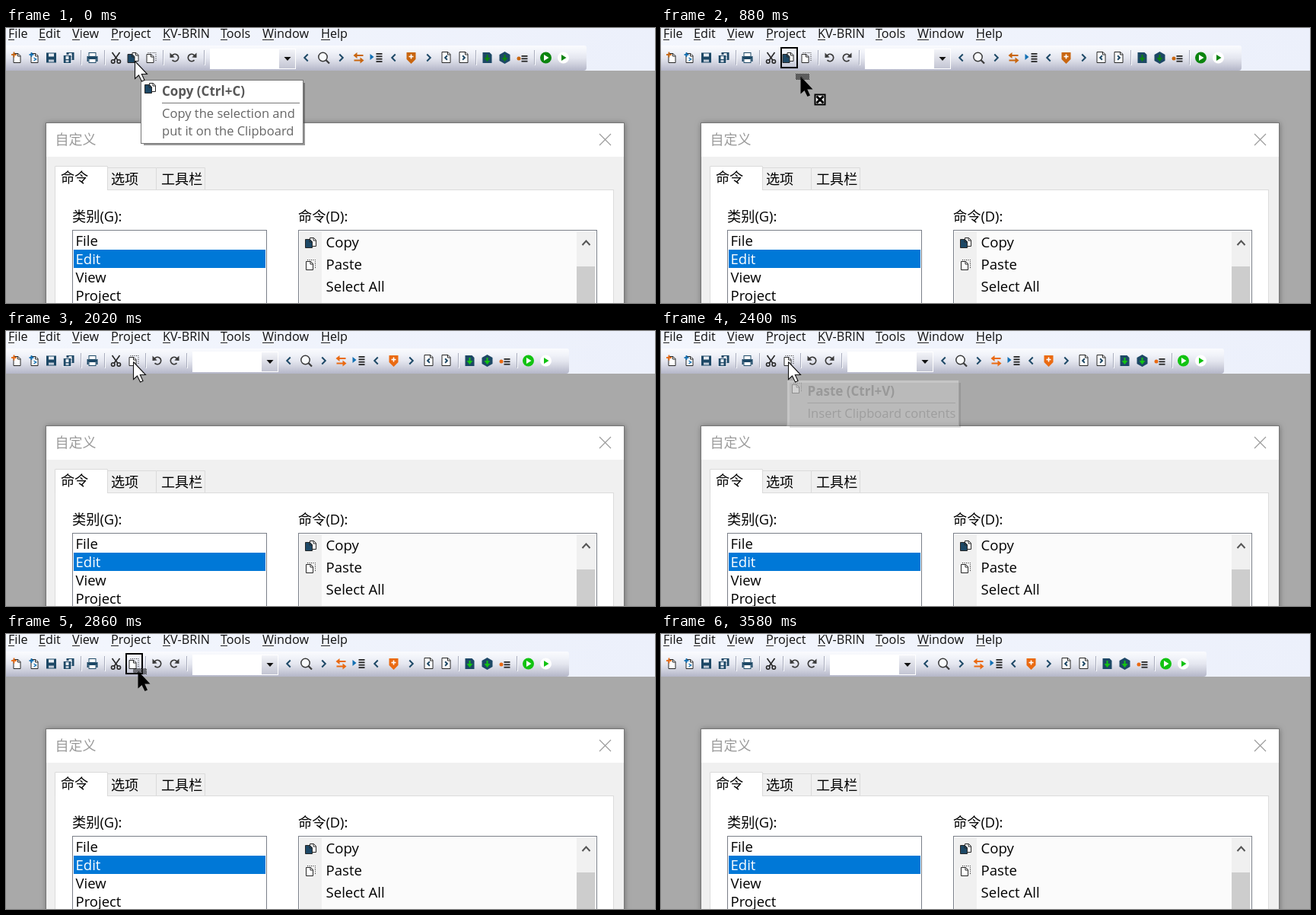
Animation, 853 px wide and 361 px high, one loop 3960 ms. Source, as an HTML page with a canvas:

```html
<!DOCTYPE html>
<html lang="zh-CN">
<head>
<meta charset="utf-8">
<title>Toolbar customisation</title>
<style>
html, body { margin: 0; width: 100%; height: 100%; overflow: hidden; background: #a9a9a9; }
canvas { display: block; }
</style>
</head>
<body>
<canvas id="stage" width="853" height="361"></canvas>
<script>
const ctx = document.getElementById('stage').getContext('2d');
const LOOP = 3960, PITCH = 23, GAP = 8, ROW = 39;
const FONT = '"Open Sans", "Noto Sans", "Noto Sans CJK SC", "Noto Sans CJK", sans-serif';
const NAVY = '#1d4866', INK = '#262626', BLUE = '#1270b4';
let green, orange;

// ---- helpers ----
function rect(color, x, y, w, h) {
  ctx.fillStyle = color;
  ctx.fillRect(x, y, w, h);
}
function frame(color, x, y, w, h, lw = 1) {
  ctx.strokeStyle = color;
  ctx.lineWidth = lw;
  ctx.strokeRect(x + lw / 2, y + lw / 2, w - lw, h - lw);
}
function trace(p) {
  ctx.beginPath();
  for (let i = 0; i < p.length; i += 2) ctx.lineTo(p[i], p[i + 1]);
}
function poly(color, ...p) {
  trace(p);
  ctx.closePath();
  ctx.fillStyle = color;
  ctx.fill();
}
function line(color, lw, ...p) {
  trace(p);
  ctx.strokeStyle = color;
  ctx.lineWidth = lw;
  ctx.stroke();
}
function disc(color, x, y, r) {
  ctx.beginPath();
  ctx.arc(x, y, r, 0, 7);
  ctx.fillStyle = color;
  ctx.fill();
}
function arc(color, lw, x, y, r, a = 0, b = 2 * Math.PI) {
  ctx.beginPath();
  ctx.arc(x, y, r, a, b);
  ctx.strokeStyle = color;
  ctx.lineWidth = lw;
  ctx.stroke();
}
function cross(color, lw, x, y, r) {
  line(color, lw, x - r, y - r, x + r, y + r);
  line(color, lw, x + r, y - r, x - r, y + r);
}
function plus(color, lw, x, y, r) {
  line(color, lw, x - r, y, x + r, y);
  line(color, lw, x, y - r, x, y + r);
}
function text(s, x, y, size, color = '#000', weight = 400) {
  ctx.font = `${weight} ${size}px ${FONT}`;
  ctx.fillStyle = color;
  ctx.fillText(s, x, y);
}
function at(x, y, draw) {
  ctx.save();
  ctx.translate(x, y);
  draw();
  ctx.restore();
}
function shade(x, y, ...colors) {
  const g = ctx.createLinearGradient(0, 0, x, y);
  colors.forEach((c, i) => g.addColorStop(i / (colors.length - 1), c));
  return g;
}

// ---- icons, centred on 0,0 ----
function page(x, y, w, h, fill = '#fff') {
  const outline = [x, y, x + w - 3, y, x + w, y + 3, x + w, y + h, x, y + h, x, y];
  poly(fill, ...outline);
  line(INK, 1, ...outline);
  line(INK, 1, x + w - 3.5, y, x + w - 3.5, y + 3.5, x + w, y + 3.5);
}
function floppy(x, y, s) {
  rect(NAVY, x, y, s, s);
  rect('#e8edf3', x + 3, y + 1, s - 6, 4);
  rect('#c3ccd8', x + 3, y + s - 4, s - 6, 3);
}
function chevron(dir, s = 4.5, lw = 2) {
  line(NAVY, lw, -dir * s / 2, -s, dir * s / 2, 0, -dir * s / 2, s);
}
function turn(dir) {
  ctx.scale(dir, 1);
  arc('#3a3a3a', 1.7, 0.5, 0, 4.7, -2.5, 2.4);
  poly('#3a3a3a', -6, -6.5, -6, 0, 0.2, -0.4);
}
function downArrow() {
  rect(green, -1, -4, 2, 5);
  poly(green, -4, 0, 4, 0, 0, 5);
}
function arrow(dir, y) {
  line(orange, 2, -6 * dir, y, 4 * dir, y);
  poly(orange, 7 * dir, y, 2 * dir, y - 4, 2 * dir, y + 4);
}
function play(color) { poly(color, -2.5, -4, -2.5, 4, 4, 0); }
function bars(x, y, w, n) {
  for (let i = 0; i < n; i++) rect(INK, x, y + 3.4 * i, w, 1.8);
}
const icons = {
  fresh() {
    page(-3.5, -5.5, 9, 12);
    plus(orange, 1.8, -3, -4, 3.5);
  },
  project() {
    page(-3.5, -5.5, 9, 12);
    plus(BLUE, 1.8, -3, -4, 3);
    line(BLUE, 1.5, 0, 0, 3, 2, 0, 4);
  },
  save() { floppy(-6.5, -6.5, 13); },
  saveAll() {
    floppy(-3, -7, 10);
    floppy(-7, -3, 10);
    frame('#e6e8f0', -8, -4, 12, 12);
  },
  print() {
    rect(NAVY, -7, -2, 14, 7);
    for (const y of [-7, 1]) {
      rect('#fff', -5, y, 10, 6);
      frame(NAVY, -5, y, 10, 6);
    }
  },
  cut() {
    for (const d of [-1, 1]) {
      line(INK, 1.6, 5 * d, -7, -2.5 * d, 3.5);
      arc(INK, 1.6, 3.8 * d, 5, 2.2);
    }
  },
  copy() {
    page(-1.5, -6.5, 8, 11);
    page(-7.5, -4.5, 9, 11, NAVY);
  },
  paste() {
    ctx.setLineDash([1, 1.5]);
    line(INK, 1, -4, -6.5, 6.5, -6.5, 6.5, 5);
    ctx.setLineDash([]);
    page(-5.5, -4.5, 9, 11);
  },
  undo() { turn(1); },
  redo() { turn(-1); },
  prev() { chevron(-1); },
  next() { chevron(1); },
  find() {
    disc('#f8fafc', -1, -1, 5.5);
    arc('#3a3a3a', 1.5, -1, -1, 5.7);
    line('#3a3a3a', 2.2, 3, 3, 7.5, 7.5);
  },
  swap() {
    arrow(-1, -3);
    arrow(1, 3.5);
  },
  jump() {
    poly(BLUE, -8, -5, -8, 3, -3, -1);
    bars(0, -6, 8, 4);
  },
  mark() {
    poly(orange, -6, -7, 6, -7, 6, 2, 0, 8, -6, 2);
    plus('#fff', 1.6, 0, -1.5, 3);
  },
  pageBack() {
    page(-5.5, -7.5, 11, 14);
    chevron(-1, 2.8);
  },
  pageOn() {
    page(-5.5, -7.5, 11, 14);
    chevron(1, 2.8);
  },
  load() {
    poly(NAVY, -6, -7, 3, -7, 6, -4, 6, 7, -6, 7);
    downArrow();
  },
  build() {
    poly(NAVY, 0, -8, 7, -4, 7, 4, 0, 8, -7, 4, -7, -4);
    downArrow();
  },
  stop() {
    disc(orange, -4.5, 1, 2.5);
    bars(-1, -3, 8, 3);
  },
  run() {
    disc(green, 0, 0, 7.5);
    play('#fff');
  },
  runAlt() {
    disc('#fff', 0, 0, 7.5);
    play(green);
  }
};
function icon(name, x, y) { at(x, y, icons[name]); }

// Groups flow from the left; a removed button closes its own gap.
const groups = ['fresh project save saveAll', 'print', 'cut copy paste', 'undo redo', 'combo',
  'prev find next swap jump prev mark next pageBack pageOn', 'load build stop', 'run runAlt']
  .map(g => g.split(' '));

// ---- scene ----
const menu = { File: 3, Edit: 43, View: 87, Project: 138, 'KV-BRIN': 206, Tools: 282, Window: 337, Help: 414 };

function drawMenu() {
  rect(shade(853, 0, '#f3f6fd', '#ecf0fb'), 0, 0, 853, 56);
  for (const [s, x] of Object.entries(menu)) {
    text(s, x, 13, 16.2, '#111');
    rect('#222', x, 15, Math.round(ctx.measureText(s[0]).width), 1);
  }
}

function separator(x) {
  rect('#a9adbd', x, 29, 1, 19);
  rect('#fafbfe', x + 1, 30, 1, 19);
}

function combo(x) {
  rect('#fff', x, 27, 113, 27);
  at(x + 91, 28, () => rect(shade(0, 25, '#f3f4f8', '#c3c5d3'), 0, 0, 21, 25));
  poly('#111', x + 97.5, 38, x + 106.5, 38, x + 102, 43);
}

function drawToolbar(removed) {
  green = removed.length ? '#12c312' : '#0b840f';
  orange = removed.length ? '#ea6a12' : '#c9660f';
  at(0, 23, () => {
    ctx.beginPath();
    ctx.roundRect(-5, 0, 768 - PITCH * removed.length, 33, [0, 3, 4, 0]);
    ctx.fillStyle = shade(0, 33, '#fafbfe', '#f1f3f9', '#e4e6ef', '#cdcfdc', '#b4b6c8');
    ctx.fill();
  });
  let x = 13.5;
  groups.forEach((group, i) => {
    if (group[0] === 'combo') {
      combo(Math.round(x - GAP));
      x += 119;
      return;
    }
    for (const name of group) {
      if (removed.includes(name)) continue;
      icon(name, x, ROW);
      x += PITCH;
    }
    if (i < groups.length - 1) separator(Math.round(x - GAP));
    x += GAP;
  });
}

function tab(x, y, w, h, fill) {
  rect(fill, x, y, w, h);
  line('#dadada', 1, x + 0.5, y + h, x + 0.5, y + 0.5, x + w - 0.5, y + 0.5, x + w - 0.5, y + h);
}

function drawDialog() {
  ctx.save();
  ctx.shadowColor = 'rgba(0,0,0,.4)';
  ctx.shadowBlur = 7;
  ctx.shadowOffsetY = 1;
  rect('#fff', 53, 124, 760, 250);
  ctx.restore();
  rect('#f0f0f0', 53, 169, 759, 192);
  frame('#777', 52, 124, 761, 250);
  text('自定义', 64.5, 153, 18, '#9a9a9a');
  cross('#999', 1.1, 787.5, 146.5, 7.5);

  rect('#fff', 64, 212, 735, 160);
  frame('#dcdcdc', 64, 212, 735, 160);
  tab(133, 183, 65, 29, '#f0f0f0');
  tab(197, 183, 65, 29, '#f0f0f0');
  tab(64, 181, 70, 32, '#fff');
  text('命令', 72, 203, 18.1);
  text('选项', 138, 205, 18.1);
  text('工具栏', 204, 205, 18.1);
  text('类别(G):', 87, 254, 18.2);
  text('命令(D):', 384, 254, 18.2);

  frame('#7a7f88', 87, 265, 256, 120);
  rect('#0078d7', 89, 291, 252, 24);
  ['File', 'Edit', 'View', 'Project'].forEach((s, i) =>
    text(s, 91.5, 286 + 24 * i, 18.5, i === 1 ? '#fff' : '#000'));

  frame('#7a7f88', 384, 265, 393, 120);
  rect('#fbfbfb', 386, 267, 364, 94);
  rect('#f0f0f0', 386, 267, 29, 94);
  ['Copy', 'Paste', 'Select All'].forEach((s, i) => text(s, 420.5, 288 + 29 * i, 18.6));
  icon('copy', 401, 282);
  icon('paste', 400, 311);
  rect('#f0f0f0', 750, 267, 25, 94);
  rect('#cdcdcd', 750, 313, 24, 48);
  line('#555', 2, 757.5, 285, 762.5, 279.5, 767.5, 285);
}

function drawTip(x, y, w, name, title, lines, left, alpha = 1) {
  const h = 38 + 23 * lines.length;
  ctx.globalAlpha = alpha;
  rect('rgba(70,70,70,.55)', x + 4, y + 4, w - 2, h - 2);
  rect('#fff', x, y, w, h);
  frame('#767676', x, y, w, h);
  icon(name, x + 13, y + 11);
  text(title, left, y + 21, 17, '#575757', 700);
  rect('#777', left, y + 30, x + w - 5 - left, 1);
  lines.forEach((s, i) => text(s, left, y + 50 + 23 * i, 16.55, '#666'));
  ctx.globalAlpha = 1;
}

const pointer = [0, 0, 0, 23, 5, 18.5, 9, 26.5, 12.5, 25, 8.8, 17, 16, 17];
function arrowCursor() {
  poly('#fff', ...pointer);
  line('#111', 1.1, ...pointer, 0, 0);
}
function dragCursor(outside) {
  for (let y = 0; y < 8; y++)
    for (let x = y % 2; x < 18; x += 2) rect('#111', x - 6.5, y - 3.5, 1, 1);
  poly('#000', ...pointer);
  if (!outside) return;
  rect('#000', 18, 23, 15, 15);
  rect('#e4e4e4', 20, 25, 11, 11);
  cross('#000', 3, 25.5, 30.5, 4.5);
}

// ---- motion ----
const speedUp = p => p ** 1.9;
const slowDown = p => 1 - (1 - p) ** 2.5;
const even = p => p;
const legs = [
  { start: 550, end: 1020, from: [169, 43], to: [203, 91], ease: speedUp },
  { start: 1480, end: 2020, from: [202, 83], to: [167, 40], ease: even },
  { start: 2710, end: 3110, from: [167, 40], to: [208, 92], ease: speedUp },
  { start: 3110, end: 3580, from: [208, 92], to: [745, 368], ease: slowDown }
];

// The pointer is sampled about every 75 ms, as in a screen recording.
function pointerAt(t) {
  const leg = legs.findLast(l => l.start <= t) || legs[0];
  const held = Math.floor(Math.max(0, t - leg.start) / 75) * 75;
  const k = t >= leg.end ? 1 : leg.ease(held / (leg.end - leg.start));
  return leg.from.map((a, i) => Math.round(a + (leg.to[i] - a) * k) + 0.5);
}

function draw(t) {
  const within = (a, b) => t >= a && t < b;
  const dragging = within(550, 1110) || within(2710, 3110);
  const removed = ['copy', 'paste'].slice(0, (t >= 1110) + (t >= 3110));
  rect('#a9a9a9', 0, 0, 853, 361);
  drawMenu();
  drawToolbar(removed);
  drawDialog();
  if (dragging) frame('#000', 157, 25, 23, 28, 2);
  if (t < 550) {
    drawTip(177, 68, 214, 'copy', 'Copy (Ctrl+C)',
      ['Copy the selection and', 'put it on the Clipboard'], 205);
  }
  if (within(2400, 2710)) {
    const shown = Math.min(1, (1 + Math.floor((t - 2400) / 85)) / 3);
    drawTip(165, 64, 227, 'paste', 'Paste (Ctrl+V)', ['Insert Clipboard contents'], 192.5, shown);
  }
  const [x, y] = pointerAt(t);
  at(x, y, () => dragging ? dragCursor(y > 56) : arrowCursor());
}

const start = performance.now();
function tick() {
  draw((performance.now() - start) % LOOP);
  requestAnimationFrame(tick);
}
tick();
</script>
</body>
</html>
```
